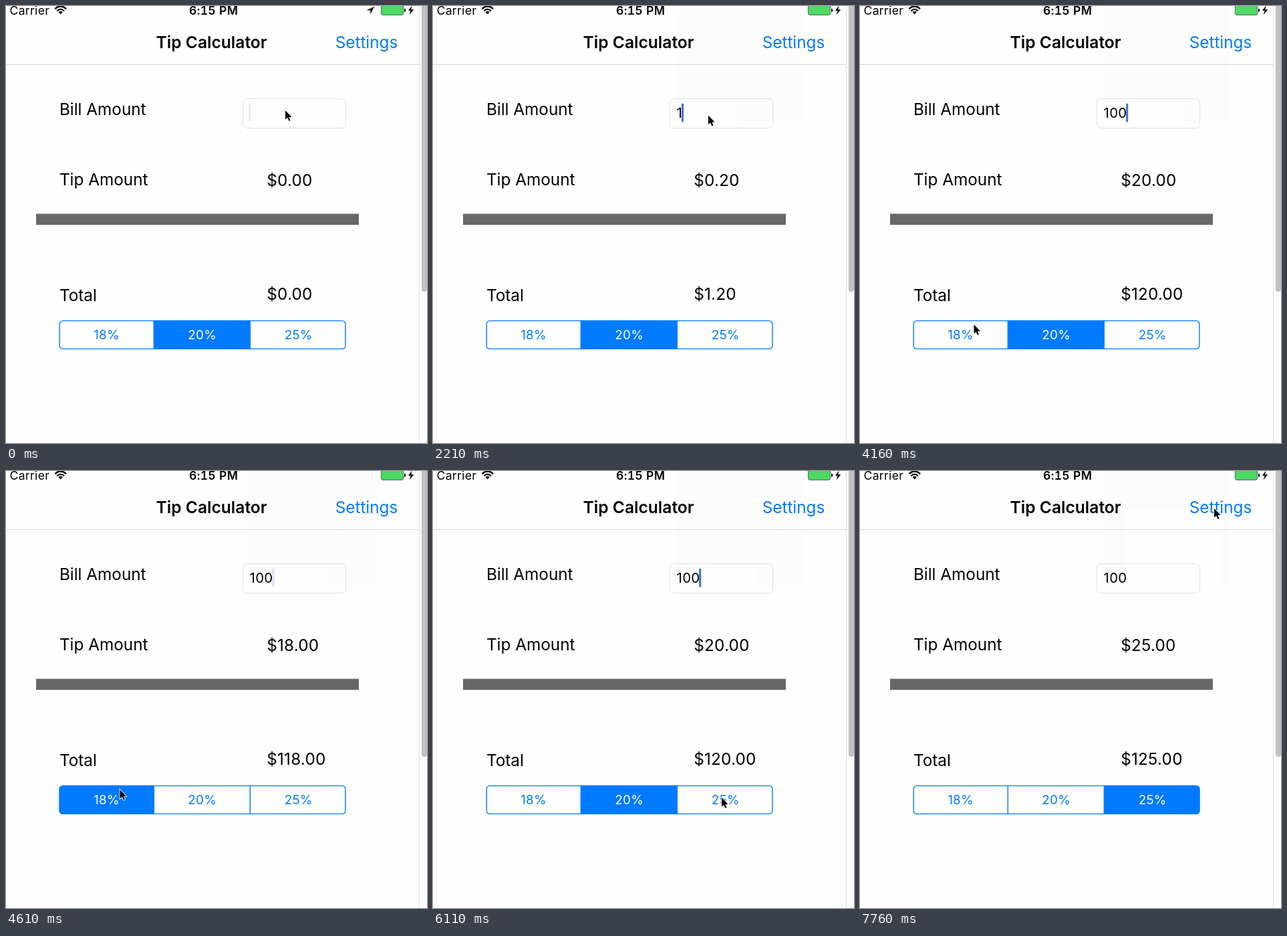
Animation, 630 px wide and 653 px high, one loop 8 s. Source, as an HTML page:

```html
<!DOCTYPE html>
<html lang="en">
<head>
<meta charset="utf-8">
<title>Tip Calculator</title>
<style>
  html, body { margin: 0; width: 100%; height: 100%; overflow: hidden; background: #fefefe; }
  svg { display: block; width: 630px; height: 653px; }
  text { font-family: Inter, Roboto, sans-serif; font-size: 24.3px; font-optical-sizing: none; white-space: pre; }
  .mid { text-anchor: middle; }
  .title { font-size: 24.6px; font-weight: 600; }
  .status { font-size: 17.6px; letter-spacing: .3px; }
  .clock { font-weight: 600; font-variant-numeric: tabular-nums; }
  .input { font-size: 20.4px; letter-spacing: .25px; }
  .money { letter-spacing: .2px; }
  .seg text { font-size: 18.9px; letter-spacing: .2px; text-anchor: middle; }
  .blue { fill: #007aff; }
</style>
</head>
<body>
<svg viewBox="0 0 630 653">
  <rect width="630" height="653" fill="#fefefe"/>

  <!-- status bar -->
  <text class="status" x="5.5" y="13">Carrier</text>
  <g fill="none" stroke="#000" stroke-width="2.3">
    <path d="M73.3 4.3Q81.7-3.4 90.1 4.3M76.3 7.3Q81.7 2.5 87.1 7.3"/>
    <path d="M78.6 9.1Q81.7 6.5 84.8 9.1L81.7 12.4Z" fill="#000" stroke="none"/>
  </g>
  <text class="status clock mid" x="310.6" y="13">6:15 PM</text>
  <path id="locate" d="M551.3 0.8L539.6 6.6H545.4V12.6Z"/>
  <rect x="561.4" y="-5" width="33.2" height="18.4" rx="2.5" fill="#4cd964" stroke="#444" stroke-width=".8"/>
  <path d="M596 3.6q2.2.6 2.2 2.9t-2.2 2.9z"/>
  <path d="M607.4-.5L602 7h3.6L603.6 13.5 610.2 5.2H606.3Z"/>

  <!-- navigation bar -->
  <text class="title mid" x="307.6" y="63">Tip Calculator</text>
  <text class="blue mid" x="539.5" y="63">Settings</text>
  <rect y="87" width="618" height="1" fill="#d2d2d2"/>

  <!-- form -->
  <text x="79.9" y="163">Bill Amount</text>
  <rect x="354.5" y="138.5" width="154" height="44" rx="6" fill="#fefefe" stroke="#e2e2e2"/>
  <path id="shade" fill="#000" fill-opacity=".008" fill-rule="evenodd"/>
  <text class="input" id="bill" x="364.6" y="167"></text>
  <rect id="caret" y="145.5" width="3" height="28" rx="1.5" fill="#426bdf"/>
  <text x="79.9" y="268">Tip Amount</text>
  <text class="money" id="tip" x="390.2" y="269"></text>
  <rect x="45" y="310.5" width="483" height="16.5" fill="#686868"/>
  <text x="79.9" y="440.5">Total</text>
  <text class="money" id="total" x="390.2" y="439"></text>

  <!-- tip rate control -->
  <clipPath id="round"><rect x="79.5" y="469.7" width="429" height="43.3" rx="5.5"/></clipPath>
  <g class="seg" id="seg" clip-path="url(#round)"></g>
  <path d="M221.3 470V513M365.3 470V513" stroke="#007aff" stroke-width="1.4"/>
  <rect x="80.2" y="470.4" width="427.7" height="42" rx="5" fill="none" stroke="#007aff" stroke-width="1.4"/>

  <!-- window edge and scroll bar -->
  <rect x="618" width="12" height="653" fill="#fbfbfb"/>
  <rect x="618" width="1" height="653" fill="#dedede"/>
  <rect x="622" y="-10" width="8" height="437" rx="4" fill="#c1c1c1"/>

  <path id="mouse" d="M0 0V13.6L3.1 10.8 5.3 15.8 7.5 14.9 5.4 10H9.5Z" stroke="#fff" stroke-width="1.6" paint-order="stroke"/>
</svg>
<script>
const LOOP = 8000, STEP = 150, OFFSET = 110;
const CLICK = 1310, LEAVE = 3560;
const RATES = [18, 20, 25], EDGES = [79, 221, 365.5, 509];
const KEYS = [2210, 2810, 2960];

// Pointer moves: start, duration, x, y.
const MOVES = [
  [1160, 300, 412, 163.5], [3410, 150, 256, 353.5], [3560, 600, 170.5, 476],
  [4610, 600, 305.5, 486], [5660, 450, 432, 488], [6860, 900, 530, 56]
];
// Taps on the rate control: time, segment.
const TAPS = [[-LOOP, 1], [4460, 0], [5510, 1], [6260, 2]];

const el = id => document.getElementById(id);
const set = (id, name, value) => el(id).setAttribute(name, value);
const clamp = v => Math.min(1, Math.max(0, v));
const ease = u => u * u * (3 - 2 * u);
const money = n => "$" + n.toFixed(2);
const box = (x, y, r, b) => `M${x} ${y}H${r}V${b}H${x}Z`;

const segs = RATES.map((rate, i) => {
  const x = EDGES[i], w = EDGES[i + 1] - x;
  const label = cls => `<text class="${cls}" x="${x + w / 2 + .4}" y="498">${rate}%</text>`;
  const fill = `<rect class="blue" x="${x}" y="469" width="${w}" height="44"/>`;
  el("seg").insertAdjacentHTML("beforeend", label("blue") + `<g>${fill}<g fill="#fff">${label("")}</g></g>`);
  return el("seg").lastElementChild;
});

function pointer(t) {
  let x = 418, y = 156;
  for (const [start, time, toX, toY] of MOVES) {
    const u = ease(clamp((t - start) / time));
    x += (toX - x) * u;
    y += (toY - y) * u;
  }
  return `translate(${x} ${y})`;
}

// Blinks once a second, but stays lit from the click until typing is over.
function caretLight(t) {
  if (t >= CLICK && t < LEAVE) return 1;
  const phase = (t + 260) % 1000;
  return clamp((phase - 200) / 150) * clamp((900 - phase) / 150);
}

function shade(t, count) {
  if (t < CLICK) return "";
  const hole = t > 7100 ? box(398, 56, 541, 174) : count ? box(364, 145, count > 1 ? 483 : 456, 174) : "";
  return box(364, 0, 552, 174) + hole;
}

function draw(t) {
  const count = KEYS.filter(k => k <= t).length;
  const bill = "100".slice(0, count);
  const now = TAPS.findLastIndex(([time]) => time <= t);
  const [tapped, pick] = TAPS[now];
  const fade = t - tapped < STEP ? .88 : 1;
  const tip = bill * RATES[pick] / 100;

  segs.forEach((s, i) => s.setAttribute("opacity", i === pick ? fade : now && i === TAPS[now - 1][1] ? 1 - fade : 0));
  el("bill").textContent = bill;
  el("tip").textContent = money(tip);
  el("total").textContent = money(+bill + tip);
  set("caret", "x", 363.4 + el("bill").getComputedTextLength());
  set("caret", "opacity", caretLight(t));
  set("locate", "opacity", t < CLICK ? 1 : 0);
  set("shade", "d", shade(t, count));
  set("mouse", "transform", pointer(t));
}

function tick() {
  const t = performance.now() % LOOP;
  draw(Math.floor((t - OFFSET) / STEP) * STEP + OFFSET);
  requestAnimationFrame(tick);
}
tick();
</script>
</body>
</html>
```
